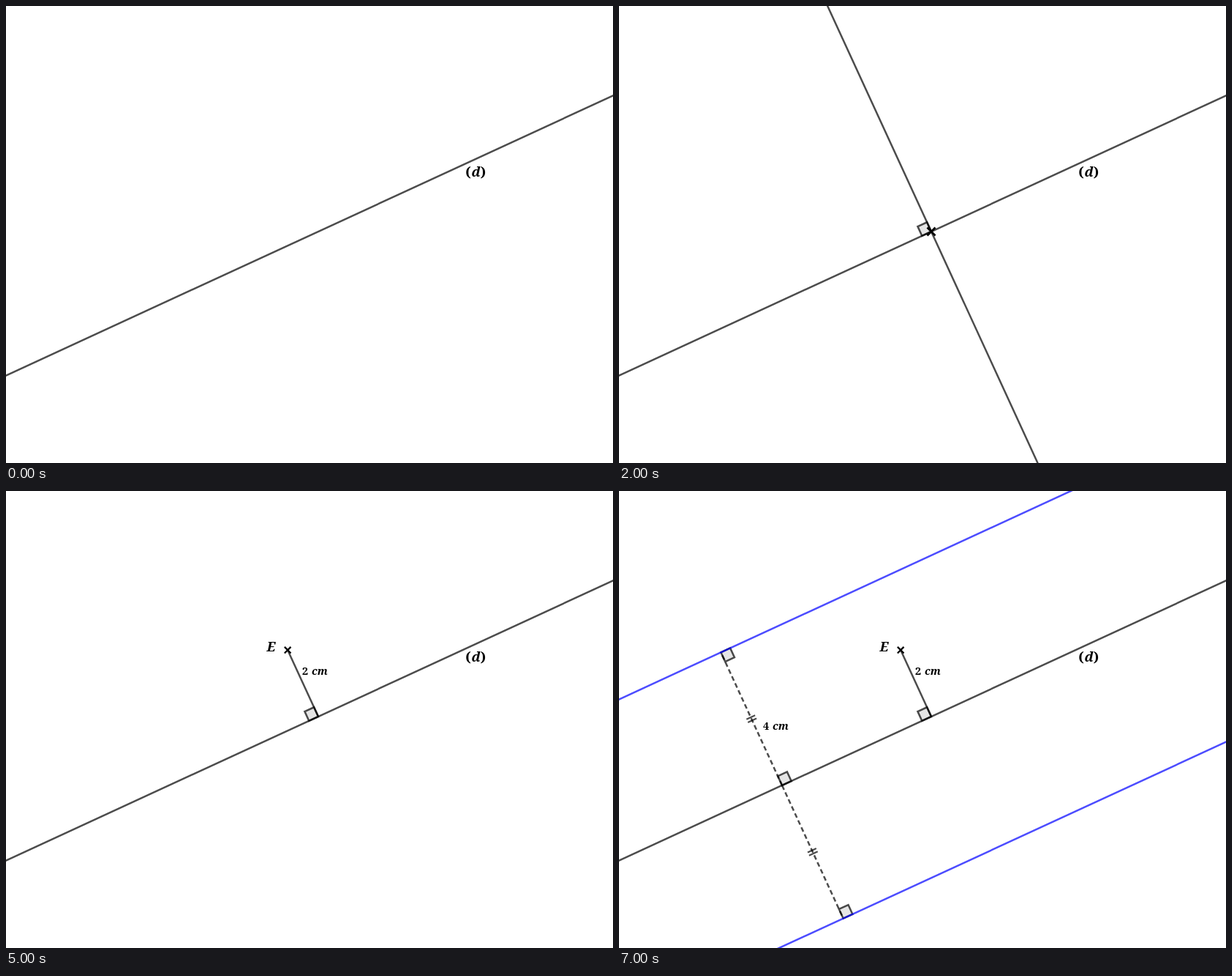
An HTML page for the animation above (8 s loop, 830 by 624 pixels).

```html
<!DOCTYPE html>
<html lang="en">
<head>
<meta charset="utf-8">
<title>Parallel lines at a given distance</title>
<style>
  html, body { margin: 0; width: 100%; height: 100%; overflow: hidden; background: #fff; }
  svg { display: block; width: 830px; height: 624px; }
  .line { fill: none; stroke: #000; stroke-opacity: .7; stroke-width: 2.5; }
  .blue { stroke: #00f; }
  .dash { stroke-dasharray: 6.5 4; }
  .mark { fill: #000; fill-opacity: .1; }
  .tick { stroke-width: 2.2; }
  .cross { fill: none; stroke: #000; }
  text { font: italic bold 18.5px "Noto Serif", "Liberation Serif", serif; }
  .up { font-style: normal; }
  .small { font-size: 14.5px; }
</style>
</head>
<body>
<svg id="stage" viewBox="0 0 830 624"></svg>
<script>
const NS = "http://www.w3.org/2000/svg";
const LOOP = 8000, STEPS = 8;
const stage = document.getElementById("stage");

// Unit vectors along (d) and perpendicular to it
const angle = Math.atan(0.4605);
const u = [Math.cos(angle), -Math.sin(angle)];
const n = [Math.sin(angle), Math.cos(angle)];
const move = (p, a, b) => [p[0] + a * u[0] + b * n[0], p[1] + a * u[1] + b * n[1]];
const path = pts => "M" + pts.map(p => p.map(v => v.toFixed(2)).join(" ")).join("L");

// Visible from step a up to step b, with hard cuts
function show(el, a, b) {
  if (a === 0 && b === STEPS) return;
  const easing = "steps(1, end)";
  el.animate([
    { offset: 0, opacity: a ? 0 : 1, easing },
    { offset: a / STEPS, opacity: 1, easing },
    { offset: b / STEPS, opacity: b < STEPS ? 0 : 1, easing },
    { offset: 1, opacity: b < STEPS ? 0 : 1 }
  ], { duration: LOOP, iterations: Infinity });
}

function add(tag, attrs, a, b = STEPS, parent = stage) {
  const el = document.createElementNS(NS, tag);
  for (const k in attrs) el.setAttribute(k, attrs[k]);
  parent.append(el);
  show(el, a, b);
  return el;
}

const stroke = (pts, cls, a, b) => add("path", { d: path(pts), class: "line " + cls }, a, b);
const square = (p, su, sn, a) => add("path", {
  d: path([p, move(p, 14 * su, 0), move(p, 14 * su, 14 * sn), move(p, 0, 14 * sn)]) + "Z",
  class: "line mark"
}, a);
const cross = ([x, y], r, width, a, b) => add("path", {
  d: `M${x - r} ${y - r}l${2 * r} ${2 * r}m0 ${-2 * r}l${-2 * r} ${2 * r}`,
  class: "cross", "stroke-width": width
}, a, b);

// Each part is [text, x, class]
function label(y, parts, a) {
  const t = add("text", { y }, a);
  for (const [s, x, cls] of parts)
    add("tspan", { x, class: cls || "" }, 0, STEPS, t).textContent = s;
}

const foot = [427, 308];
const E = move(foot, 0, -100);
const foot2 = [223, 402];
const top2 = move(foot2, 0, -200);
const low2 = move(foot2, 0, 200);
const across = p => [move(p, -1000, 0), move(p, 1000, 0)];

stroke(across(foot), "", 0);
stroke([move(foot, 0, -500), move(foot, 0, 500)], "", 1, 5);
add("circle", { cx: foot[0], cy: foot[1], r: 100, class: "line" }, 3, 5);
stroke([E, foot], "", 5);
square(foot, -1, -1, 2);

for (const end of [top2, low2]) {
  stroke([foot2, end], "dash", 6);
  const mid = [(foot2[0] + end[0]) / 2, (foot2[1] + end[1]) / 2];
  for (const k of [-2.3, 2.3])
    stroke([move(mid, -6.5, k), move(mid, 6.5, k)], "tick", 6);
}
square(foot2, 1, -1, 6);
square(top2, 1, 1, 6);
square(low2, 1, -1, 6);

stroke(across(top2), "blue", 7);
stroke(across(low2), "blue", 7);

cross(foot, 5.5, 2.8, 1, 5);
cross(E, 4.3, 2.3, 4);

label(232.7, [["(", 628.3, "up"], ["d", 636.5], [")", 648.8, "up"]], 0);
label(219.2, [["E", 356.5]], 4);
label(251.3, [["2", 405, "up small"], ["cm", 418, "small"]], 3);
label(326.3, [["4", 197, "up small"], ["cm", 210, "small"]], 6);
</script>
</body>
</html>
```
